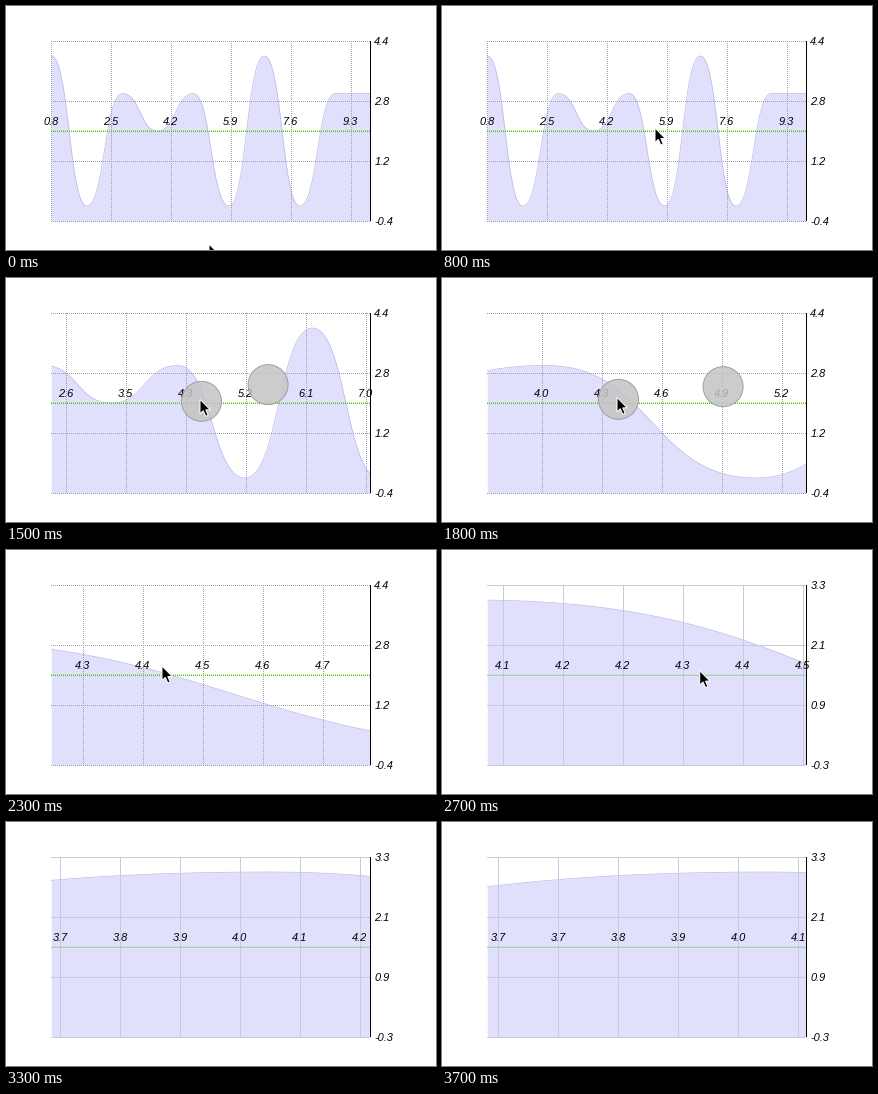
Animation of 430 by 244 pixels, one loop 3800 ms. Source, as a matplotlib script:

```python
import numpy as np
import matplotlib.pyplot as plt
from matplotlib.animation import FuncAnimation

W, H, DPI = 430, 244, 100
FRAMES, INTERVAL = 38, 100
LEFT, RIGHT, TOP, BOTTOM = 45, 364, 35, 215
CELL = 60                    # pixels between grid lines
PX = 72 / DPI                # one pixel in points
PINCH_START, PINCH_END = 13, 21
DRAG_START, DRAG_END = 23, 30
PINCH_CENTRE = np.array([228.8, 115])
WIDE_STEP, CLOSE_STEP = 1.69, 0.0835   # data units per cell
ARROW = np.array([(0, 0), (0, 14.5), (3.3, 11.4), (5.8, 17),
                  (8.2, 16), (5.8, 10.5), (10.3, 10.5)])

plt.rcParams["font.family"] = "Liberation Sans"
fig = plt.figure(figsize=(W / DPI, H / DPI), dpi=DPI, facecolor="white")
ax = fig.add_axes([0, 0, 1, 1])


def progress(i, start, end):
    return min(max((i - start) / (end - start), 0), 1)


def smooth_curve(values, n=60):
    """Join unit-spaced values by Bezier segments with flat ends."""
    t = np.linspace(0, 1, n)
    along, rise = 1.5 * t * (1 - t) + t**3, t * t * (3 - 2 * t)
    xs = [i + along for i in range(len(values) - 1)]
    ys = [a + (b - a) * rise for a, b in zip(values, values[1:])]
    return np.concatenate(xs), np.concatenate(ys)


CURVE_X, CURVE_Y = smooth_curve([4, 0, 3, 2, 3, 0, 4, 0, 3, 3])


def view(i):
    """Centre, units per cell, grid phase and label shift (in cells)."""
    zoom = progress(i, PINCH_START, PINCH_END)
    step = WIDE_STEP * (CLOSE_STEP / WIDE_STEP) ** zoom**1.12
    swing = np.sin(np.pi * zoom)
    phase = 0.4 * zoom + 0.72 * swing
    shift = 0.49 - 0.34 * swing
    drag = 0.4 * progress(i, DRAG_START, DRAG_END)
    glide = 0.29 * (1 - np.exp(-max(i - DRAG_END, 0) / 4))
    centre = 4.4925 - 0.023 * zoom - drag - glide
    return centre, step, phase, shift


def pointer(i):
    enter = progress(i, 0, 5)
    pinch = progress(i, PINCH_START - 1, PINCH_END)
    drag = progress(i, DRAG_START, DRAG_END)
    return np.array([203 + 10 * enter - 57 * pinch + 178 * drag,
                     238 - 116 * enter - 6 * pinch**2 + 8 * drag])


def rule(xs, ys, color, dotted=True, width=1.0):
    style = (0, (1 / width, 1 / width)) if dotted else "-"
    ax.plot(xs, ys, color=color, lw=width * PX, ls=style, snap=False,
            dash_capstyle="butt", solid_capstyle="butt")


def label(x, y, value, align):
    ax.text(x, y, f"{value:.1f}", size=11 * PX, style="italic",
            color="black", ha=align, va="center_baseline")


def draw_chart(i):
    centre, step, phase, shift = view(i)
    start = centre - (RIGHT - LEFT) / 2 / CELL * step
    dragging = i > DRAG_START
    peak = 4 if i < DRAG_START + 3 else 3
    high, low = 1.1 * peak, -0.1 * peak
    px = np.linspace(LEFT, RIGHT, 640)
    values = np.interp(start + (px - LEFT) * step / CELL, CURVE_X, CURVE_Y)
    py = TOP + (high - values) / (high - low) * (BOTTOM - TOP)
    ax.fill_between(px + 0.3, py, BOTTOM, color="#e0e0fd", lw=0)
    ax.plot(px + 0.3, py, color="#b8b8e8", lw=0.7 * PX)

    grid = "#c9c9e2" if dragging else "#a0a0a4"
    first = np.ceil(start / step - phase - 0.02)
    marks = []
    for n in range(6):
        value = (first + n + phase) * step
        x = LEFT + (value - start) / step * CELL
        if x <= RIGHT:
            marks.append((x, value + shift * step))
            rule([round(x) + 0.5] * 2, [TOP, BOTTOM], grid, not dragging)
    for y in range(TOP, BOTTOM + 1, CELL):
        rule([LEFT, RIGHT], [y + 0.5] * 2, grid, not dragging)
        label(368.3, y - 0.1,
              high - (y - TOP) / (BOTTOM - TOP) * (high - low), "left")

    rule([LEFT, RIGHT], [125.3] * 2, "#9ccb90" if dragging else "#48c800",
         not dragging, 1.0 if dragging else 1.5)
    rule([RIGHT + 0.5] * 2, [TOP, BOTTOM], "black", False)
    for x, value in marks:
        label(x - 0.3, 115, value, "center")


def draw_pointer(i):
    tip = pointer(i)
    if PINCH_START <= i <= PINCH_END:
        touch = tip + (1.5, 2)
        for spot in (touch, 2 * PINCH_CENTRE - touch):
            ax.add_patch(plt.Circle(spot, 20, fc=(0.77, 0.77, 0.77, 0.85),
                                    ec="#9a9a9a", lw=0.9 * PX, zorder=5))
    if i <= DRAG_END + 2:
        ax.add_patch(plt.Polygon(ARROW + tip, fc="black", ec="white",
                                 lw=PX, snap=False, zorder=6))


def draw(i):
    ax.clear()
    ax.set(xlim=(0, W), ylim=(H, 0))
    ax.axis("off")
    draw_chart(i)
    draw_pointer(i)
    return []


anim = FuncAnimation(fig, draw, frames=FRAMES, interval=INTERVAL,
                     init_func=lambda: draw(0), repeat=True, repeat_delay=0)
plt.show()
```
